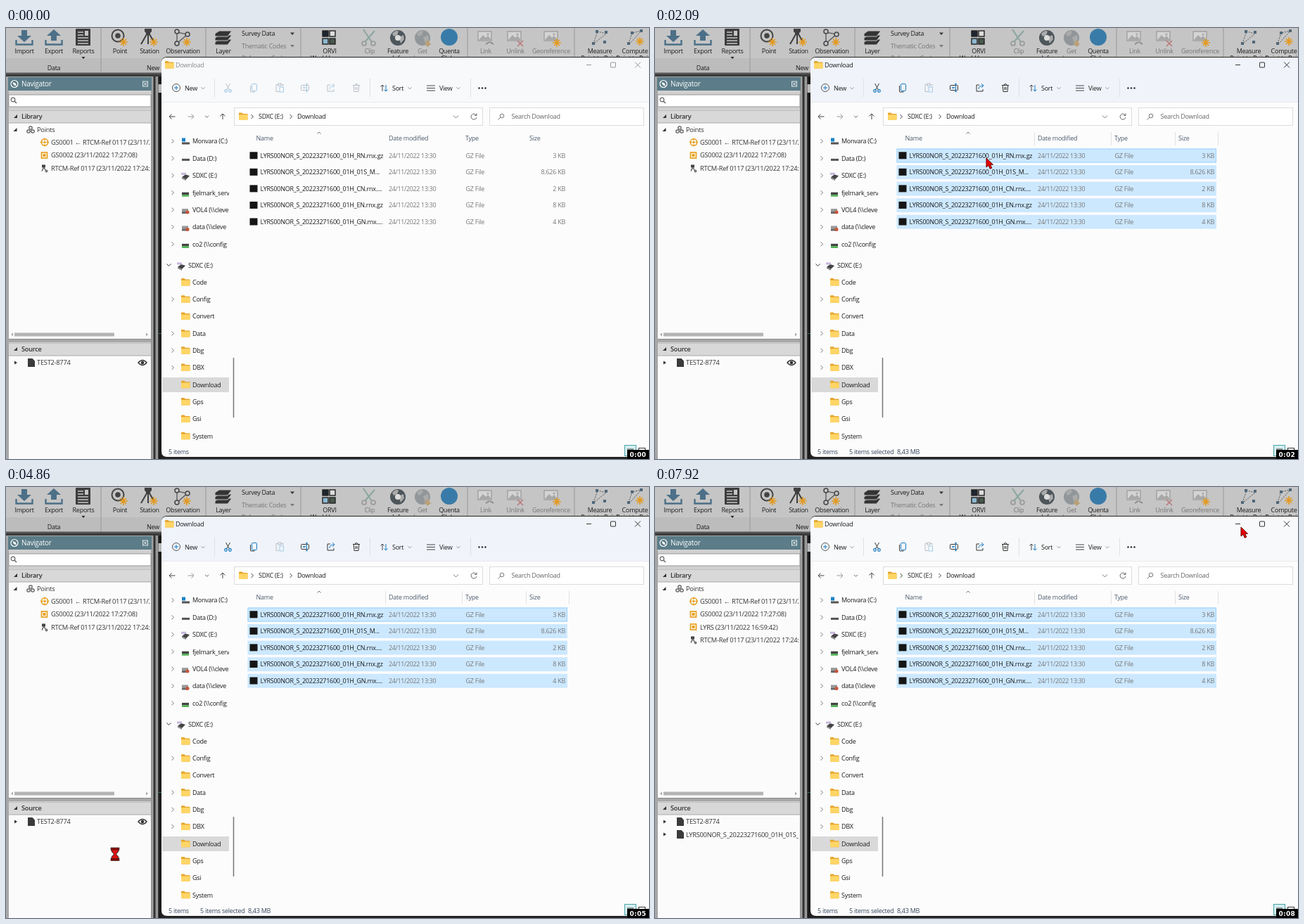
An HTML page for the animation above (8 s loop, 914x613 px).

```html
<!DOCTYPE html>
<html lang="en">
<head>
<meta charset="utf-8">
<title>Importing files by drag and drop</title>
<style>
html, body { margin: 0; width: 100%; height: 100%; overflow: hidden; background: #222; }
svg { display: block; width: 914px; height: 613px; }
text { font: 9px "Open Sans", "Noto Sans", sans-serif; letter-spacing: -.26px; fill: #1c1c1c; white-space: pre; }
</style>
</head>
<body>
<svg id="stage" viewBox="0 0 914 613" xmlns="http://www.w3.org/2000/svg"></svg>
<script>
const LOOP = 8000;
const stage = document.getElementById('stage');

// Markup helpers
const rect = (x, y, w, h, fill, extra = '') =>
  `<rect x="${x}" y="${y}" width="${w}" height="${h}" fill="${fill}" ${extra}/>`;
const line = (d, color = '#333', w = 1, extra = '') =>
  `<path d="${d}" fill="none" stroke="${color}" stroke-width="${w}" ${extra}/>`;
const shape = (d, fill, extra = '') => `<path d="${d}" fill="${fill}" ${extra}/>`;
const disc = (x, y, r, fill, extra = '') => `<circle cx="${x}" cy="${y}" r="${r}" fill="${fill}" ${extra}/>`;
const ring = (x, y, r, color, w = 1) => disc(x, y, r, 'none', `stroke="${color}" stroke-width="${w}"`);
// y is the middle of the line of text
const text = (x, y, s, { size = 9, fill = '#1c1c1c', anchor = 'start', weight = 400 } = {}) =>
  `<text x="${x}" y="${y + 3.3}" text-anchor="${anchor}" style="font-size:${size}px;fill:${fill};font-weight:${weight}">${s}</text>`;
const group = (id, body, extra = '') => `<g id="${id}" ${extra}>${body}</g>`;
const at = (x, y, body) => `<g transform="translate(${x} ${y})">${body}</g>`;
const clip = (id, x, y, w, h) => `<clipPath id="${id}"><rect x="${x}" y="${y}" width="${w}" height="${h}"/></clipPath>`;

// Small icons
const star = (x, y) => line(`M${x - 6} ${y}h12M${x} ${y - 6}v12M${x - 4} ${y - 4}l8 8M${x + 4} ${y - 4}l-8 8`, '#e39a22', 1.7);
const chevron = (x, y, color = '#777') => line(`M${x - 1.5} ${y - 3}l3 3l-3 3`, color);
const down = (x, y, color = '#888') => line(`M${x - 2.5} ${y - 1.2}l2.5 2.5l2.5-2.5`, color, .9);
const folder = (x, y) =>
  shape(`M${x} ${y - 4.5}q0-1 1-1h3.5l1.5 1.5h5.5q1 0 1 1v7q0 1-1 1h-10.5q-1 0-1-1z`, '#e5a52c') +
  rect(x, y - 2.7, 12.5, 7.7, '#ffd566', 'rx="1"');
const picture = (x, mark) =>
  rect(x, 5, 19, 13, '#d4d4d4', 'stroke="#a2a2a2" stroke-width="1.5"') +
  shape(`M${x + 1} 17l6-7l4 4l3-3l5 6z`, '#a8a8a8') + disc(x + 14, 9, 1.6, '#aaa') + mark;
const dots = (list, color) => list.map(([x, y]) => rect(x - 2, y - 2, 4, 4, color)).join('');

function ribbon() {
  const mid = { anchor: 'middle' }, dim = { anchor: 'middle', fill: '#777' };
  const label = (x, s, o = mid, y = 33) => text(x, y, s, o);
  const tray = '#4c7088';
  const globe = (x, c) => disc(x, 14, 11, c) +
    shape(`M${x - 8} 8q6-6 9-3l-2 5l-5 2zM${x + 1} 13l7-3l1 6l-5 6z`, '#aaa');
  const tile = (x, y, c) => rect(x, y, 8, 8, c, 'stroke="#222" stroke-width="1.4"');
  return rect(0, 0, 914, 65, '#c5c5c5') + rect(0, 43, 221, 21, '#bcbcbc') + rect(0, 63.5, 221, 2.5, '#555') +
    [135, 284, 419, 656, 808].map(x => line(`M${x} 0V63`, '#989898')).join('') +
    shape('M22 3h8v8h6L26 20L16 11h6z', tray) + line('M14.5 17v6.5h23V17', tray, 2.4) +
    shape('M64 18v-7h-6L68 2l10 9h-6v7z', tray) + line('M56.5 17v6.5h23V17', tray, 2.4) +
    rect(99, 1, 21, 24, '#3d3d3d', 'rx="1"') + line('M102 6h8M102 10h8M102 14h15M102 18h15M102 22h15', '#c5c5c5', 1.3) + rect(112, 4, 5, 7, '#c5c5c5') +
    ring(159, 11, 8.5, '#444', 2) + disc(159, 11, 3.8, '#444') + star(167, 20) +
    shape('M197 1h10v4l-2 2v3h-6V7l-2-2z', '#3f3f3f') + line('M200 9l-8 14M202 9v14M204 9l7 12', '#3f3f3f', 2) + star(210, 20) +
    line('M243 22V6L258 9L243 22', '#555', 1.3) + [[243, 5], [258, 9], [243, 22]].map(p => disc(...p, 3, '#c5c5c5', 'stroke="#444" stroke-width="1.5"')).join('') + star(257, 20) +
    [20, 14, 8].map(y => shape(`M297 ${y}l6-4h18l-6 8h-18z`, '#343434', 'stroke="#c5c5c5"')).join('') +
    tile(450, 4, '#1e2630') + tile(460, 4, '#ddd') + tile(450, 15, '#8cb8d0') + tile(460, 15, '#48584c') +
    line('M508 2l12 18M524 4l-14 16', '#8aa5a0', 2) + ring(509, 22, 3, '#999', 1.7) + ring(522, 22, 3, '#999', 1.7) +
    globe(557, '#4d565b') + disc(557, 14, 4, '#ddd') + globe(592, '#909699') + shape('M597 18h5v4h3l-5.5 5l-5.5-5h3z', '#b9a078') +
    disc(630, 13, 12, '#397ba8') +
    picture(671, line('M682 23l5-3M688 20l5 3', '#8a8a8a', 2)) +
    picture(713, line('M727 18l8 8M735 18l-8 8', '#bb7b7b', 1.7)) +
    picture(765, star(783, 21)) +
    line('M835 22l6-17l12 3l-17 14', '#555', 1, 'stroke-dasharray="2 1.5"') + dots([[835, 22], [840, 5], [853, 6], [851, 20]], '#50687a') +
    line('M885 22l5-15l13-3l-16 18', '#555', 1, 'stroke-dasharray="2 1.5"') + dots([[885, 22], [890, 7], [903, 4]], '#50687a') + star(901, 19) +
    label(26, 'Import') + label(68, 'Export') + label(110, 'Reports') + shape('M107.5 41h5l-2.5 3z', '#222') +
    label(162, 'Point') + label(204, 'Station') + label(251.5, 'Observation') + label(309, 'Layer') +
    label(68, 'Data', mid, 57) + label(209, 'New', mid, 57) +
    text(335, 8, 'Survey Data') + text(335, 25.5, 'Thematic Codes', { fill: '#777' }) + text(335, 43, 'Reference Codes', { fill: '#777' }) +
    shape('M404 6.5h6l-3 3.5z', '#333') + shape('M404 24h6l-3 3.5z', '#777') + shape('M404 41h6l-3 3z', '#777') +
    label(460, 'ORVI') + label(460, 'World Images', mid, 43) + label(517, 'Clip', dim) +
    label(557, 'Feature') + label(557, 'Info', mid, 43) + label(592, 'Get', dim) + label(592, 'Layers', dim, 43) +
    label(630, 'Quenta') + label(630, 'Globe', mid, 43) + label(682, 'Link', dim) + label(724, 'Unlink', dim) + label(775, 'Georeference', dim) +
    label(844, 'Measure') + label(844, 'Point to Point', mid, 43) + label(894, 'Compute') + label(894, 'Point to Point', mid, 43);
}

function navigatorPanel() {
  const item = { size: 9.3, fill: '#333' };
  const head = (y, s) => rect(4, y - 9, 202, 18, '#d8d8d8') + line(`M4 ${y - 9}h202M4 ${y + 9}h202`, '#a9a9a9') +
    shape(`M16 ${y - 3}v5h-5z`, '#333') + text(22, y, s, { size: 9.2, weight: 600, fill: '#333' });
  const target = (x, y) => ring(x, y, 4.7, '#e8a020', 1.6) + disc(x, y, 1.7, '#e8a020') +
    line(`M${x - 6} ${y}h3.5M${x + 2.5} ${y}h3.5M${x} ${y - 6}v3.5M${x} ${y + 2.5}v3.5`, '#e8a020', 1.3);
  const square = (x, y) => rect(x - 4, y - 4, 8, 8, '#fff', 'stroke="#e8a020" stroke-width="1.7"') + rect(x - 2, y - 2, 4, 4, '#e8a020');
  const file = y => shape(`M31 ${y - 6}h6.5l3.5 3.5v8.5h-10z`, '#3b3b3b') + shape(`M12 ${y - 2.5}v5l4-2.5z`, '#333');
  const base = at(0, 199.5, rect(51, -5, 5, 4, '#444') + line('M53.5-1l-2.5 5M54-1l3 5', '#444', 1.2) + disc(57.5, 4, 2, '#777') +
    text(64, 0, 'RTCM-Ref 0117 (23/11/2022 17:24:43)', item));
  return rect(0, 66, 211, 547, '#a7a7a7') + rect(0, 66, 221, 3, '#3b3b3b') +
    rect(207, 69, 2.5, 544, '#a0a0a0') + rect(209.5, 69, 3, 544, '#333') + rect(212.5, 69, 4, 544, '#999') + rect(216.5, 69, 4.5, 544, '#1c1c1c') +
    rect(216.5, 434, 4.5, 1, '#386b50') + rect(216.5, 80, 4.5, 12, '#bbb') +
    rect(3, 70, 204, 19, '#5b7c88') + ring(12, 79.5, 5, '#fff', 1.2) + shape('M9.5 77l4 1.5l1.5 4l-4-1.5z', '#fff') +
    text(22, 80, 'Navigator', { size: 9.9, fill: '#fff' }) + rect(194.5, 76, 7, 7, 'none', 'stroke="#dfe7ea"') + line('M196 77.5l4 4M200 77.5l-4 4', '#fff') +
    rect(4, 89, 202, 28, '#d0d0d0') + rect(4, 95, 202, 17, '#fff', 'stroke="#999"') + ring(10, 102, 2.8, '#666', 1.2) + line('M12 104l3 3', '#666', 1.5) +
    rect(4, 116, 202, 326, '#fbfbfb') + rect(4, 447, 202, 166, '#fbfbfb') + line('M4 442.5h202M206.5 95v518', '#8d8d8d') +
    head(126, 'Library') + head(457, 'Source') +
    shape('M15.5 142v5h-5z', '#333') + [[35, 142], [32, 147], [38, 147]].map(([x, y]) => ring(x, y, 2.2, '#555', 1.2)).join('') + text(44, 145, 'Points', item) +
    `<g clip-path="url(#navClip)">` + target(55, 162.5) + text(64, 163, 'GS0001 ← RTCM-Ref 0117 (23/11/2022)', item) +
    square(54.5, 181) + text(64, 181, 'GS0002 (23/11/2022 17:27:08)', item) + group('station', base) +
    group('added', square(54.5, 199) + text(64, 199.5, 'LYRS (23/11/2022 16:59:42)', item) +
      file(494) + text(44, 494.5, 'LYRS00NOR_S_20223271600_01H_01S_MO.rnx', item)) + '</g>' +
    file(476) + text(44, 476, 'TEST2-8774', item) +
    group('eye', line('M188 476q6-7 12 0q-6 7-12 0z', '#333', 1.3) + disc(194, 476, 2.3, '#333')) +
    rect(12, 433.5, 142, 5, '#b4b4b4') + shape('M10 433.5v5l-3-2.5zM199 433.5v5l3-2.5z', '#aaa');
}

function toolbar() {
  const tool = (ink, accent) =>
    at(315.5, 85, line('M-3-6l5 9M3-6l-5 9', ink) + ring(-3, 4.5, 1.8, accent, 1.2) + ring(3, 4.5, 1.8, accent, 1.2)) +
    at(352.5, 85, rect(-3, -5.5, 7, 10, 'none', `rx="1.2" stroke="${accent}"`) + line('M-5-3v8q0 1 1 1h5', ink)) +
    at(425, 85, rect(-5.5, -3.5, 11, 7, 'none', `rx="1" stroke="${ink}"`) + line('M-3 0h4', accent, 1.5) + line('M2.5-5.5v11M1-5.5h3M1 5.5h3', accent)) +
    at(462, 85, line('M-1-4h-4v9h9v-3', ink) + line('M-2 2q0-5 6-5M2-6l3 3l-3 3', accent)) +
    at(498, 85, line('M-5-3.5h10M-2-3.5q0-2 2-2t2 2M-3.8-3.5l.8 9h6l.8-9M-1-1v4M1-1v4', ink));
  return ring(242, 85, 5.5, '#555') + line('M239 85h6M242 82v6', '#1478bd') + text(254, 85.5, 'New') + down(280, 85.5) +
    line('M296.5 72v26M517.5 72v26M660.5 72v26', '#dde1e6') +
    group('toolsOff', tool('#b9bfc7', '#a5cbe5')) + group('toolsOn', tool('#333', '#1478bd')) +
    at(389, 85, line('M-2-4.5h-3v10h4M2-4.5h3v2', '#b9bfc7') + rect(-2, -6, 4, 3, 'none', 'stroke="#b9bfc7"') + rect(0, -1, 5.5, 7, 'none', 'stroke="#a5cbe5"')) +
    line('M535 90v-9M532.5 83.5l2.5-2.5l2.5 2.5', '#444') + line('M540 81v9M537.5 87.5l2.5 2.5l2.5-2.5', '#1478bd') +
    text(549, 85.5, 'Sort') + down(574, 85.5) +
    line('M598 82h12M598 85.5h12M598 89h12', '#444') + text(616, 85.5, 'View') + down(643, 85.5) +
    [672.5, 677, 681.5].map(x => disc(x, 85.5, 1.2, '#222')).join('');
}

function tree() {
  const drive = (x, y) => shape(`M${x + 1} ${y + 2}l5-4l6 2l-5 5z`, '#444') + shape(`M${x + 1} ${y + 2}l6 3v2l-6-3z`, '#888') + rect(x, y - 4.5, 7, 3, '#c7b6dc');
  const share = (y, c) => rect(250, y - 1, 10, 3.5, '#444') + rect(250, y + 2.5, 10, 2.5, c);
  const broken = y => rect(250, y - 2, 9, 4, '#999') + rect(250, y + 2, 7, 3, '#666') + disc(258, y + 3, 2.5, '#c8543b');
  const icons = [
    y => rect(250, y - 5, 5, 5, '#1b83c8') + rect(250, y + 1, 11, 3, '#555'),
    y => rect(250, y, 11, 3, '#555'), y => drive(249, y),
    y => share(y, '#48b04b'), broken, broken, y => share(y, '#48b04b')];
  const drives = ['Monvara (C:)', 'Data (D:)', 'SDXC (E:)', 'fjelmark_server', 'VOL4 (\\\\cleve', 'data (\\\\cleve', 'co2 (\\\\config'];
  const folders = ['Code', 'Config', 'Convert', 'Data', 'Dbg', 'DBX', 'Download', 'Gps', 'Gsi', 'System'];
  const closed = ['Config', 'Data', 'Dbg', 'DBX'];
  return rect(222, 497, 95, 21, '#d9d9d9') + `<g clip-path="url(#treeClip)">` +
    drives.map((s, i) => { const y = 161 + i * 24.4; return chevron(237, y) + icons[i](y + .5) + text(265, y, s); }).join('') +
    line('M228.5 335.5l3 3l3-3', '#333') + drive(243, 338) + text(259, 337.5, 'SDXC (E:)') +
    folders.map((s, i) => {
      const y = 361.5 + i * 24.3;
      return (closed.includes(s) ? chevron(237, y) : '') + folder(249, y) + text(265, y, s);
    }).join('') + '</g>' + line('M323.5 469v85', '#777', 1.5);
}

function fileList() {
  const files = [['RN.rnx.gz', '3 KB'], ['01S_M...', '8.626 KB'], ['CN.rnx....', '2 KB'], ['EN.rnx.gz', '8 KB'], ['GN.rnx....', '4 KB']];
  const gray = { fill: '#777' }, head = { fill: '#4d5c6e' };
  const rowY = i => 181.3 + i * 23.55;
  return group('focus', rect(344.5, 172, 453, 19, '#fff', 'stroke="#a6d5f7"')) +
    group('picked', files.map((f, i) => rect(343.5, rowY(i) - 9.8, 454.5, 20, '#cce8ff')).join('') + rect(344, 172, 453.5, 19, 'none', 'stroke="#99d1ff"')) +
    group('columns', line('M539.5 148v19M648.5 148v19M739.5 148v19M800.5 148v19', '#e1e1e1')) +
    line('M442.5 150.5l2.5-2.5l2.5 2.5', '#777') +
    text(355.5, 157, 'Name', head) + text(544, 157, 'Date modified', head) + text(653, 157, 'Type', head) + text(744, 157, 'Size', head) +
    files.map(([name, size], i) => {
      const y = rowY(i);
      return rect(346.5, y - 5, 11, 10, '#151515') + text(361.5, y, 'LYRS00NOR_S_20223271600_01H_' + name) +
        text(544, y, '24/11/2022 13:30', { ...gray, size: 8.8 }) + text(653.5, y, 'GZ File', gray) + text(795, y, size, { ...gray, anchor: 'end' });
    }).join('');
}

function explorer() {
  return shape('M221 613V49q0-8 8-8h685v572z', '#222') +
    shape('M221 602V50q0-8 8-8h685v568H229q-8 0-8-8z', '#fcfcfc') +
    shape('M221 105V50q0-8 8-8h685v63z', '#f0f4fa', 'id="header"') + line('M221 105.5h693', '#e9eaee') +
    folder(226, 52.5) +
    group('title', text(241, 53, 'Download') + line('M825 52.5h7') + rect(859.5, 49, 7, 7, 'none', 'stroke="#333" rx=".5"') + line('M894 48.5l8 8M902 48.5l-8 8')) +
    toolbar() +
    line('M240.5 126h-8M235.5 122.5l-3.5 3.5l3.5 3.5', '#444') + line('M258.5 126h8M263.5 122.5l3.5 3.5l-3.5 3.5', '#999') +
    down(285.5, 126, '#555') + line('M308 130v-8M304.5 125.5l3.5-3.5l3.5 3.5', '#444') +
    rect(324.5, 113.5, 353, 25, '#fff', 'stroke="#dcdcdc"') + rect(687.5, 113.5, 219, 25, '#fff', 'stroke="#dcdcdc"') +
    folder(331, 126) + chevron(350, 126, '#444') + text(359, 126, 'SDXC (E:)') + chevron(405, 126, '#444') + text(414, 126, 'Download') +
    line('M636 124.5l3.5 3.5l3.5-3.5', '#777') + line('M668.5 124a4 4 0 1 0 .5 3M669 121.5v3h-3', '#666') +
    ring(705, 125, 2.8, '#777') + line('M703 127l-3.5 3.5', '#777') + text(718.5, 126, 'Search Download', { fill: '#666' }) +
    tree() + fileList() +
    text(231, 602.5, '5 items', { fill: '#34465c' }) +
    group('status', text(276, 602.5, '5 items selected', { fill: '#34465c' }) + text(344, 602.5, '8,43 MB', { fill: '#34465c' })) +
    rect(879.5, 593.5, 16, 15, '#d5eef0', 'stroke="#46a5a9"') + line('M883 599h9M883 602h9', '#333') + rect(899.5, 597.5, 9, 7, '#fff', 'stroke="#333"') +
    rect(883, 600, 31, 13, '#000') +
    '<text id="clock" x="886.5" y="609.5" style="font:bold 9px \'DejaVu Sans\',sans-serif;letter-spacing:.3px;fill:#fff"></text>';
}

function pointers() {
  const arrow = 'M0 0v13l3-2.7l2.3 5l2.5-1.2l-2.3-4.8h4z';
  const plain = (fill, edge) => shape(arrow, fill, `stroke="${edge}" stroke-linejoin="round"`);
  const cap = y => rect(-6, y, 12, 3, '#8e0000', 'stroke="#222" stroke-width=".6"');
  return group('arrow', plain('#e80000', '#6b0000')) +
    group('drag', ring(1, 0, 7.5, '#222') + plain('#fff', '#111') +
      rect(3.5, 16.5, 5, 5, 'none', 'stroke="#222" stroke-dasharray="1 1"') + rect(8.5, 16.5, 5, 5, '#fff', 'stroke="#222"') + line('M9.5 19h3M11 17.5v3', '#222', .8)) +
    group('wait', shape('M-5-7h10v3l-3.5 4.2l3.5 4.3v3h-10v-3l3.5-4.3l-3.5-4.2z', '#e01010', 'stroke="#222"') + cap(-9) + cap(6.5));
}

stage.innerHTML = '<defs>' + clip('navClip', 4, 116, 200, 497) + clip('treeClip', 222, 148, 95, 447) + '</defs>' +
  rect(0, 0, 914, 613, '#222') + ribbon() + navigatorPanel() + explorer() + pointers();

const el = {};
stage.querySelectorAll('[id]').forEach(n => el[n.id] = n);
const show = (id, on) => el[id].setAttribute('display', on ? 'inline' : 'none');
const move = (id, x, y) => el[id].setAttribute('transform', `translate(${x.toFixed(2)} ${y.toFixed(2)})`);

// Pointer path: time, x, y
const path = [
  [370, 189, 18], [760, 330, 190], [1160, 476, 367], [1240, 476, 367], [1710, 471, 185], [2100, 471, 185],
  [2380, 430, 229], [2620, 320, 346], [2740, 225, 447], [3000, 155, 522], [6489, 155, 522],
  [6490, 168, 551], [6670, 186, 575], [6850, 202, 614], [7219, 835, 614],
  [7220, 835, 585], [7480, 748, 400], [7700, 790, 190], [7920, 833, 57], [LOOP, 833, 57]];

function pointerAt(t) {
  const i = path.findIndex(p => p[0] > t);
  if (i < 1) return path[0].slice(1);
  const [a, b] = [path[i - 1], path[i]];
  const k = (t - a[0]) / (b[0] - a[0]);
  return [a[1] + (b[1] - a[1]) * k, a[2] + (b[2] - a[2]) * k];
}

function draw(t) {
  const active = t >= 1100, picked = t >= 1480, added = t >= 6040;
  const [x, y] = pointerAt(t);
  const dragging = t >= 2620 && t < 3370 && x < 216;
  const waiting = t >= 4430 && t < 6200;
  el.title.setAttribute('opacity', active ? 1 : .5);
  el.header.setAttribute('fill', active && !added ? '#f0f4fa' : '#f8f9fa');
  show('focus', active && !picked);
  show('columns', active);
  for (const id of ['picked', 'toolsOn', 'status']) show(id, picked);
  show('toolsOff', !picked);
  show('added', added);
  show('eye', !added);
  move('station', 0, added ? 18 : 0);
  el.clock.textContent = '0:0' + Math.floor((t + 140) / 1000);
  show('drag', dragging);
  show('wait', waiting);
  show('arrow', t >= 370 && !dragging && !waiting && !(t >= 6850 && t < 7220));
  for (const id of ['arrow', 'drag', 'wait']) move(id, x, y);
}

let start;
function tick(now) {
  start ??= now;
  draw((now - start) % LOOP);
  requestAnimationFrame(tick);
}
draw(0);
requestAnimationFrame(tick);
</script>
</body>
</html>
```
